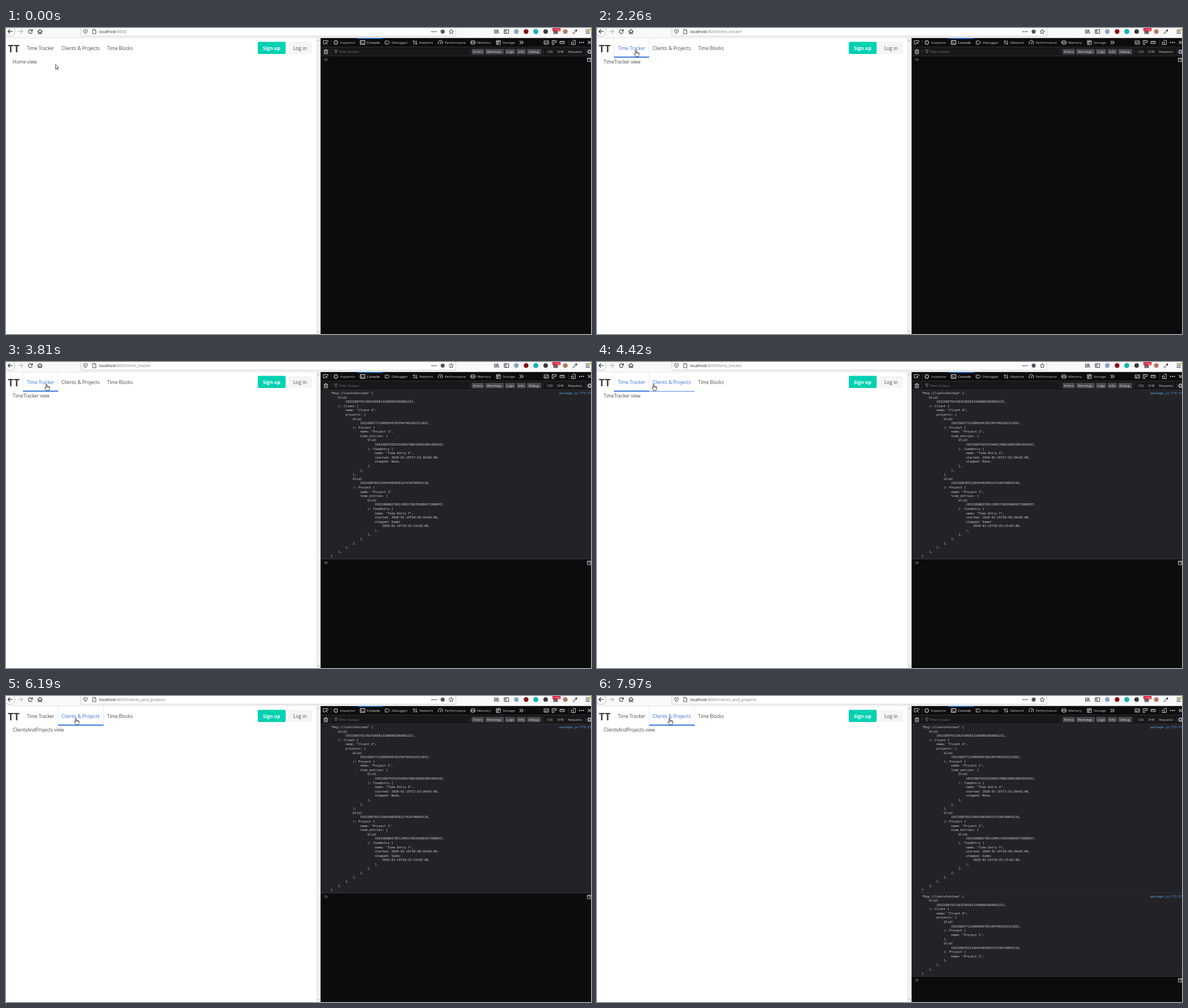
Recreate the animation shown at these times as an HTML page. Size 1034 by 542 pixels, loop 8000 ms.

```html
<!DOCTYPE html>
<html lang="en">
<head>
<meta charset="utf-8">
<title>Time tracker with developer console</title>
<style>
html, body { margin: 0; width: 100%; height: 100%; overflow: hidden; background: #fff; }
svg { display: block; width: 1034px; height: 542px; }
text { font-family: "Open Sans", "Noto Sans", sans-serif; white-space: pre; }
.mono { font-family: "DejaVu Sans Mono", "Liberation Mono", monospace; }
</style>
</head>
<body>
<svg id="stage" viewBox="0 0 1034 542" xmlns="http://www.w3.org/2000/svg"></svg>
<script>
(() => {
const LOOP = 8000;
const BLUE = '#3273dc', INK = '#4a4a4a', DARK = '#0c0c0d', LINE = '#38383d', PALE = '#d0d0d4';
const CHAR = 3.25, ROW = 7.59, OUTPUT_TOP = 50;

const escapeText = s => s.replace(/&/g, '&amp;').replace(/</g, '&lt;');
const text = (x, y, s, size, fill, more = '') =>
  `<text x="${x}" y="${y}" font-size="${size}" fill="${fill}" ${more}>${escapeText(s)}</text>`;
const rect = (x, y, w, h, fill, more = '') =>
  `<rect x="${x}" y="${y}" width="${w}" height="${h}" fill="${fill}" ${more}/>`;
const circle = (x, y, r, fill, more = '') => `<circle cx="${x}" cy="${y}" r="${r}" fill="${fill}" ${more}/>`;
const icon = (x, y, d, color, width = 1, fill = 'none') =>
  `<path transform="translate(${x} ${y})" d="${d}" fill="${fill}" stroke="${color}" stroke-width="${width}" stroke-linejoin="round"/>`;
const dots = (x, y, color) => [-3.4, 0, 3.4].map(d => circle(x + d, y, 1.1, color)).join('');

function browserBar() {
  const c = '#3b3b3f';
  return rect(0, 0, 1034, 17.5, '#f9f9fa') + rect(0, 17, 1034, 0.8, '#d4d4d6') +
    rect(132.5, -4, 662.5, 18.5, '#fff', 'stroke="#c6c6c8" stroke-width=".9" rx="1"') +
    circle(7.2, 6.2, 8.8, '#fff', 'stroke="#b5b5b8" stroke-width=".9"') +
    icon(7.5, 6.2, 'M4 0H-4M-.5 -3.7L-4 0L-.5 3.7', c, 1.3) +
    icon(25.5, 6.2, 'M-4 0H4M.5 -3.7L4 0L.5 3.7', '#b9b9bc', 1.2) +
    icon(43, 6.3, 'M3 -1.6A3.4 3.4 0 1 0 3.3 1M3.7 -4V-1H.7', c, 1.2) +
    icon(60, 6.3, 'M-4.3 .2L0 -3.8L4.3 .2M-2.9 -.6V3.6H-.9V.9H.9V3.6H2.9V-.6', c, 1.1) +
    icon(140.4, 6.3, 'M0 -3.9L3.2 -2.8C3.2 .8 2.2 2.8 0 4C-2.2 2.8 -3.2 .8 -3.2 -2.8ZM0 -2V2', c, 0.9) +
    icon(156, 6.3, 'M-2.8 -3.9H.8L2.9 -1.7V3.9H-2.8ZM.8 -3.8V-1.6H2.8', c, 0.9) +
    dots(756.5, 6.5, c) + circle(771.8, 6.3, 3.6, '#55555a') +
    icon(787, 6.3, 'M0 -4L1.2 -1.3L4.1 -1L1.9 .9L2.6 3.8L0 2.3L-2.6 3.8L-1.9 .9L-4.1 -1L-1.2 -1.3Z', c, 0.9) +
    icon(867, 6.3, 'M-3.5 -3.5V3.7M-1.2 -3.5V3.7M1 -3.5V3.7M2.2 -3L4 3.7', c, 1.1) +
    icon(884.5, 6.3, 'M-4 -3.3H4V3.3H-4ZM-.8 -3.3V3.3M-3 -1.4H-1.8M-3 .4H-1.8', c, 1) +
    circle(902, 6.3, 4.2, '#8ba5c4') + circle(919.3, 6.3, 4.2, '#8a1018') +
    circle(936.4, 6.3, 4.5, '#13b5b5') + circle(953.8, 6.3, 4, '#3a3a3d') +
    rect(967.5, 3, 8, 7.5, '#66666a') + rect(966, -1, 14, 6.6, '#d70022') +
    text(966.7, 4.6, '1152', 5.5, '#fff', 'font-weight="600"') +
    circle(988.6, 6.3, 4.1, '#b27b60') +
    icon(1006, 6.3, 'M-3.8 3.8L-3.1 1.5L.8 -2.4L2.2 -.9L-1.6 3Z', c, 0.8) +
    icon(1006, 6.3, 'M.4 -2.8L2.7 -.5M1.8 -1.8L3.3 -3.2', c, 1.8) +
    icon(1028.2, 6.3, 'M-3.7 -2.8H3.7M-3.7 0H3.7M-3.7 2.8H3.7', c, 1.1) +
    rect(1032.6, 0, 1.4, 5, '#ffbf00');
}

function page() {
  return rect(0, 17.8, 548, 524.2, '#fff') +
    text(3.2, 42.6, 'TT', 17.6, '#3f3f3f', 'font-weight="700"') +
    rect(445, 24.5, 49.3, 21.5, '#00d1b2', 'rx="2"') +
    text(454, 39, 'Sign up', 8.5, '#fff', 'font-weight="700"') +
    rect(498.7, 24.5, 42, 21.5, '#f5f5f5', 'rx="2"') +
    text(507.7, 39, 'Log in', 8.5, INK) +
    rect(548, 17.8, 8, 524.2, '#f0f0f0') +
    icon(552, 22.3, 'M-2 1L0 -1L2 1', '#98989a', 0.9) +
    icon(552, 537.7, 'M-2 -1L0 1L2 -1', '#98989a', 0.9);
}

function devtools() {
  const c = '#c9c9cd';
  const tab = (x, label, d, color = c) => icon(x, 25.7, d, color, 1) + text(x + 7.6, 28, label, 6.15, color);
  const filter = (x, w, label) => rect(x, 37, w, 9.8, '#47474c', 'rx="1"') + text(x + 3, 44.1, label, 5.8, '#e4e4e7');
  const divider = (x, y) => rect(x, y - 5, 0.8, 10, LINE);
  return rect(556, 17.8, 478, 524.2, DARK) + rect(556, 33.5, 478, 16, '#18181a') +
    rect(556, 33.3, 478, 0.7, LINE) + rect(556, 49.2, 478, 0.7, LINE) +
    rect(621.5, 17.8, 44, 1.3, '#0a84ff') +
    icon(565, 25.6, 'M-1 2.7H-4V-3.2H4V-.5M3.8 3.8L.3 .1M.2 2.8V0H3', c) + divider(574, 25.7) +
    tab(583, 'Inspector', 'M-2.7 -2.7H2.7V2.7H-2.7ZM-1 -4V-2.7M1 -4V-2.7M-1 2.7V4M1 2.7V4M-4 0H-2.7M2.7 0H4') +
    tab(630.2, 'Console', 'M-4 -3.3H4V3.3H-4ZM-2.4 -1.3L-1 0L-2.4 1.3M0 1.5H2', '#fff') +
    tab(674.2, 'Debugger', 'M-4 -2.6H1.5L4 0L1.5 2.6H-4Z') +
    tab(723, 'Network', 'M-2 3.6V-3.2M-4 -1.2L-2 -3.3L0 -1.2M2 -3.6V3.2M0 1.2L2 3.3L4 1.2') +
    tab(767.8, 'Performance', 'M-3 3A4 4 0 1 1 3 3M0 1.6L1.8 -1.8M-1 2H1') +
    tab(825.3, 'Memory', 'M-2.6 -3H2.6V3H-2.6ZM-4 -2V2M4 -2V2M-.8 -1V1M.9 -1V1') +
    tab(870.3, 'Storage', 'M-3.5 -3.5H3.5V3.5H-3.5ZM-3.5 -1.2H3.5M-1 1H1M-1 -2.4H1M-1.5 -1.2V3.5') +
    icon(911, 25.6, 'M-3.2 -3L-.2 0L-3.2 3M.3 -3L3.3 0L.3 3', c, 1.1) +
    icon(955, 25.7, 'M-4 -2.8H4V2.8H-4ZM-2 -1V1.2H0M2 1.2V-1H.5', c) +
    icon(969, 25.7, 'M-3.6 -3.4H3.8V-.3H-.8V3.6H-3.6ZM-1 -3V-1.6', c) +
    icon(983, 25.7, 'M-4 -2H4V2H-4ZM-2 -2V0M0 -2V0M2 -2V0', c) + divider(994, 25.7) +
    icon(1003, 25.7, 'M-1.5 -3.8H3.3V3.6H0M-3.8 -.8H-.2V3.7H-3.8Z', c) +
    dots(1017.3, 25.7, c) + icon(1031.3, 25.6, 'M-2.8 -2.8L2.8 2.8M2.8 -2.8L-2.8 2.8', c, 1.1) +
    icon(565.4, 42, 'M-3.7 -2.4H3.7M-1.2 -2.6V-3.8H1.2V-2.6M-2.8 -2.2V3.8H2.8V-2.2M-1 -.6V2.2M1 -.6V2.2', c) +
    divider(574, 41.7) + icon(583, 41.7, 'M-2.8 -2.8H2.8L.8 0V2.8L-.8 1.8V0Z', '#8c8c92', 0.8) +
    text(588, 43.9, 'Filter Output', 6.05, '#77777d') + divider(819.5, 41.7) +
    filter(823, 22, 'Errors') + filter(847, 33, 'Warnings') + filter(882, 18, 'Logs') +
    filter(902.3, 16.7, 'Info') + filter(921, 25, 'Debug') + divider(949.3, 41.7) +
    text(956.5, 44.1, 'CSS', 5.8, c) + text(974.3, 44.1, 'XHR', 5.8, c) + text(993.3, 44.1, 'Requests', 5.8, c) +
    divider(1024.5, 41.7) + circle(1031.3, 42, 2.3, 'none', `stroke="${c}" stroke-width="1.2"`) +
    circle(1031.3, 42, 3.5, 'none', `stroke="${c}" stroke-width="1.3" stroke-dasharray="1.37"`);
}

const PROMPT = icon(565.5, 56, 'M-2.7 -2.5L-.2 0L-2.7 2.5M.2 -2.5L2.7 0L.2 2.5', '#a9a9ae', 0.9) +
  icon(1031.5, 56.3, 'M-4 -3.2H4V3.2H-4ZM1 -3.2V3.2M-4 -1.5H4', '#c9c9cd', 0.9);

// Rust debug output; indentation follows from the brackets.
const timeEntry = (id, name, started, stopped) =>
  ['time_entries: {', 'Ulid(', id + ',', '): TimeEntry {', `name: "Time Entry ${name}",`,
    `started: ${started},`, ...stopped, '},', '},'];
const project = (id, n, entries) => ['Ulid(', id + ',', '): Project {', `name: "Project ${n}",`, ...entries, '},'];
const fetched = (first, second) =>
  ['"Msg::ClientsFetched" {', 'Ulid(', '1931580755136253058131068963560801221,', '): Client {',
    'name: "Client A",', 'projects: {',
    ...project('1931580771129092947651947992162311852', 1, first),
    ...project('1931580783133645492050127416740054116', 2, second), '},', '},', '}'];

const MESSAGES = [
  fetched(
    timeEntry('1931580793532346927086160833691956432', 'X', '2020-01-15T17:53:39+02:00', ['stopped: None,']),
    timeEntry('1931580802785119951760356084272988937', 'Y', '2020-01-15T18:58:20+02:00',
      ['stopped: Some(', '2020-01-15T19:25:23+02:00,', '),'])),
  fetched([], [])
];
const messageHeight = lines => lines.length * ROW + 3.5;

function message(lines, top) {
  let depth = 0;
  const rows = lines.map((line, i) => {
    if (/^[})]/.test(line)) depth--;
    const x = 574 + depth * 4 * CHAR;
    if (/[{(]$/.test(line)) depth++;
    return text(x, top + 7 + i * ROW, line, 5.4, PALE, 'class="mono"');
  });
  const h = messageHeight(lines);
  return rect(556, top, 478, h, '#232327') + rect(556, top + h - 1, 478, 0.8, LINE) + rows.join('') +
    text(978, top + 7, 'package.js:773:17', 5.5, '#5ba7ee', 'class="mono"');
}

const TABS = [
  { x: 30, w: 62, label: 'Time Tracker', at: 37, size: 8.15 },
  { x: 92, w: 80.5, label: 'Clients & Projects', at: 98, size: 8.35 },
  { x: 172.5, w: 58, label: 'Time Blocks', at: 178.7, size: 8.2 }
];
function tabs(active, hovered) {
  return TABS.map((t, i) => {
    const on = i === active, lit = on || i === hovered;
    const sides = on ? [t.x, t.x + t.w].map(x => rect(x - 0.4, 18, 0.8, 34, '#d9e2f3')).join('') : '';
    const under = on ? rect(t.x, 50.6, t.w, 2, BLUE) : lit ? rect(t.x, 51.6, t.w, 0.9, BLUE) : '';
    return sides + under + text(t.at, 39, t.label, t.size, lit ? BLUE : INK);
  }).join('');
}

const ROUTES = [
  { path: '', view: 'Home view', size: 8.25 },
  { path: '/time_tracker', view: 'TimeTracker view', size: 8.1 },
  { path: '/clients_and_projects', view: 'ClientsAndProjects view', size: 8.2 }
];
function routeContent(route) {
  return `<text x="164.7" y="9.4" font-size="7.08" fill="#222">localhost<tspan fill="#7d7d80">:8000${route.path}</tspan></text>` +
    text(11.8, 62.8, route.view, route.size, INK);
}

function linkHint(path, width, opacity) {
  if (!opacity) return '';
  return `<g opacity="${opacity}">` +
    rect(-2, 531, width + 2, 13, '#f9f9fa', 'stroke="#d0d0d2" stroke-width=".8"') +
    text(-1.6, 539, 'localhost:8000' + path, 6.1, '#4a4a4d') + '</g>';
}

// Share of a movement done, advancing in visible hops.
function hops(t, start, end, count) {
  if (t < start) return 0;
  return Math.min(1, (Math.floor((t - start) / (end - start) * (count - 1) + 1e-6) + 1) / count);
}

const MOVES = [
  { start: 860, end: 1240, count: 6, dx: -18.8, dy: -25.2 },
  { start: 3810, end: 4580, count: 11, dx: 45, dy: 0 },
  { start: 4650, end: 4810, count: 3, dx: 9.8, dy: 0.3 },
  { start: 7820, end: 7970, count: 3, dx: 4.7, dy: 0 }
];
function pointer(t) {
  const p = { x: 87.6, y: 64.4 };
  for (const m of MOVES) {
    const k = hops(t, m.start, m.end, m.count) ** 1.15;
    p.x += m.dx * k;
    p.y += m.dy * k;
  }
  return p;
}

const ARROW = 'M0 0V8.2L1.9 6.5L3.2 9.3L4.4 8.7L3.2 6H5.6Z';
const HAND = 'M-1 .7C-1 -.4 .7 -.4 .7 .7V4L1 3.6C1.6 3.1 2.5 3.4 2.6 4.1C3.2 3.6 4.1 3.9 4.2 4.6C4.9 4.2 5.6 4.6 5.6 5.3' +
  'V8.2L4.5 10.2V11.6H-.5V10.3L-3 7.2C-3.5 6.2 -2.4 5.5 -1.7 6.2L-1 7ZM.7 4V6M2.6 4.2V6.2M4.2 4.8V6.4';

const NAV = [1950, 5880], LOGGED = [2420, 6270];

const stage = document.getElementById('stage');
let messageTop = OUTPUT_TOP;
const messageMarkup = MESSAGES.map(lines => {
  const markup = `<g class="message">${message(lines, messageTop)}</g>`;
  messageTop += messageHeight(lines);
  return markup;
}).join('');
stage.innerHTML = browserBar() + page() + devtools() + messageMarkup + `<g id="prompt">${PROMPT}</g><g id="live"></g>`;
const messageLayers = stage.querySelectorAll('.message');
const promptLayer = stage.querySelector('#prompt');
const liveLayer = stage.querySelector('#live');

function render(t) {
  const cursor = pointer(t);
  const active = NAV.filter(at => t >= at).length - 1;
  const hovered = cursor.y < 52 ? TABS.findIndex(b => cursor.x >= b.x && cursor.x < b.x + b.w) : -1;

  let outputEnd = OUTPUT_TOP;
  MESSAGES.forEach((lines, i) => {
    const shown = t >= LOGGED[i];
    messageLayers[i].style.display = shown ? '' : 'none';
    if (shown) outputEnd += messageHeight(lines);
  });
  promptLayer.setAttribute('transform', `translate(0 ${outputEnd - OUTPUT_TOP})`);

  const hint1 = hops(t, 1400, 1550, 3) - hops(t, 2030, 2180, 3);
  const hint2 = hops(t, 4960, 5040, 2) - hops(t, 5960, 6110, 3);
  liveLayer.innerHTML = tabs(active, hovered) + routeContent(ROUTES[active + 1]) +
    linkHint(ROUTES[1].path, 80, hint1) + linkHint(ROUTES[2].path, 102.5, hint2) +
    icon(cursor.x, cursor.y, hovered < 0 ? ARROW : HAND, '#1c1c1c', 0.8, '#fff');
}

const begin = performance.now();
function tick() {
  render((performance.now() - begin) % LOOP);
  requestAnimationFrame(tick);
}
tick();
})();
</script>
</body>
</html>
```
